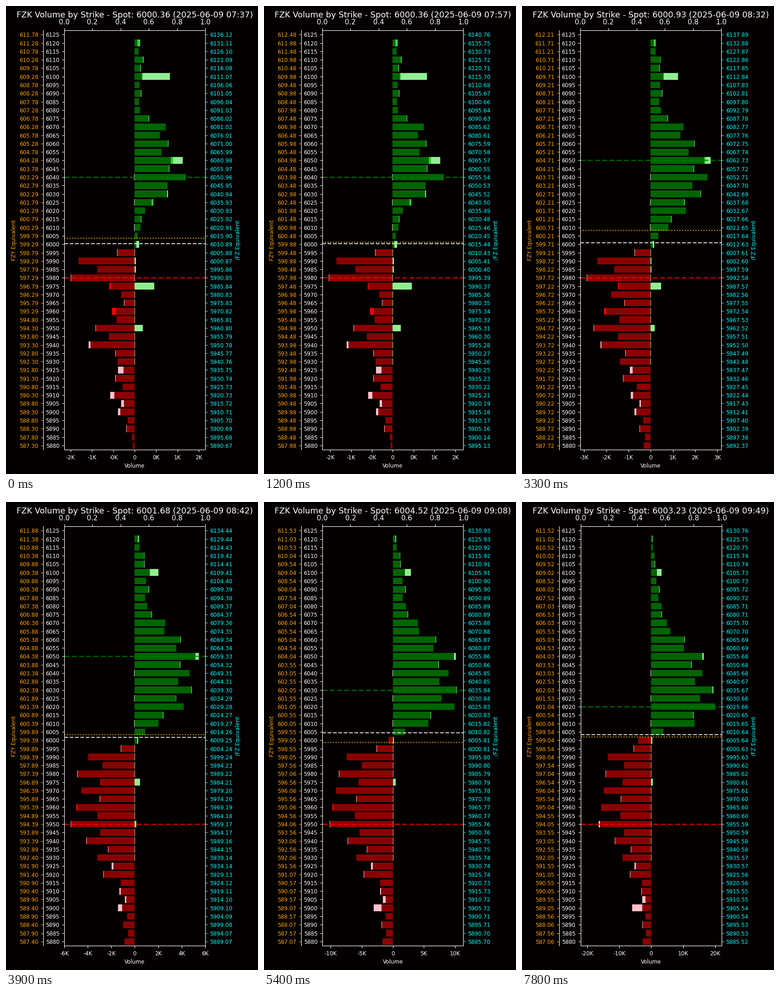
Animation of 549x1020 px, one loop 8000 ms. Source, as a matplotlib script:

```python
import matplotlib.pyplot as plt
import numpy as np
from matplotlib.animation import FuncAnimation
from matplotlib.collections import PolyCollection
from matplotlib.markers import TICKDOWN, TICKLEFT, TICKRIGHT, TICKUP
from matplotlib.patches import Rectangle

W, H, DPI = 549, 1020, 72  # at 72 dpi one point is one pixel
TOP, BOTTOM, HALF, MIDDLE_X = 53.2, 967, 153.55, 280.45
LEFT, RIGHT = MIDDLE_X - HALF, MIDDLE_X + HALF
FUND_X = LEFT - 0.3 * HALF
ROW = (BOTTOM - TOP) / 50
THIN, TICK, PAD = 1.19, 5.2, 10.4
SMALL, MEDIUM, LARGE = 11.89, 14.86, 17.83
BACK = "#040000"
COLORS = ["darkgreen", "limegreen", "lightgreen", "darkred", "red", "pink"]

STRIKES = np.arange(6125, 5875, -5)
ROWS_Y = TOP + ROW * (np.arange(50) + 0.5)


def profile(points):
    """Signed volume per strike; strikes off the tens trade less."""
    keys = sorted(points)
    volume = np.interp(STRIKES, keys, [points[k] for k in keys])
    return volume * np.where(STRIKES % 10, np.where(volume > 0, 0.78, 0.62), 1)


def blocks(points):
    return np.array([points.get(int(k), 0) for k in STRIKES], float)


# Calls are positive, puts negative
PREMARKET = profile({6125: 0, 6110: 230, 6080: 150, 6070: 900, 6050: 1050, 6040: 1500,
                     6030: 950, 6020: 300, 6000: 50, 5990: -1650, 5980: -1860, 5970: -400,
                     5960: -560, 5950: -1130, 5940: -1300, 5930: -500, 5910: -600, 5880: -60})
OPENING = profile({6125: 0, 6100: 2000, 6080: 1700, 6050: 7900, 6040: 6800, 6030: 7400,
                   6020: 6750, 6010: 3250, 6000: 300, 5990: -5500, 5980: -6900, 5950: -8250,
                   5940: -5950, 5920: -4000, 5910: -1600, 5880: -1400})
SESSION = profile({6125: 0, 6080: 3300, 6070: 4900, 6050: 16000, 6040: 16000, 6030: 19200,
                   6020: 20000, 6010: 13600, 6000: -4000, 5990: -13500, 5950: -16000,
                   5940: -11300, 5920: -6500, 5910: -2900, 5880: -2600})
MIDDLE = blocks({6120: 47, 6110: 25, 6100: 26, 6050: 60, 6025: 42, 5975: -30, 5960: -85})
OUTER = blocks({6100: 630, 6050: 220, 6030: 20, 6000: 60, 5990: 30, 5985: 25, 5975: 460,
                5950: 190, 5940: -40, 5925: -130, 5910: -95, 5905: -58, 5900: -53})
OUTER_GROWTH = blocks({6100: 730, 6050: 210, 6030: 200, 6000: 350, 5950: -550,
                       5925: -290, 5905: -1000, 5900: -3100})
CALL_HAIRLINE = (STRIKES >= 5930) & ((STRIKES % 15 == 0) | (STRIKES < 6000))
PUT_HAIRLINE = (STRIKES <= 6040) & (STRIKES % 15 == 10)

STEPS = [0, 4, 7, 11, 15, 22, 26]
FUND_RATIO = [.09988166, .0999967, .0999850, .09995244, .09984367, .09984006, .09983974]
FUTURE_RATIO = [1.0018148, 1.0025731, 1.00244817, 1.0021042, 1.00097952, 1.0009544, 1.0009396]
FLIP = [6003.6, 6001.1, 6000.8, 6008.4, 5998.2, 5999.6, 6001.95]


def strike_y(strike):
    return ROWS_Y[0] + (6125 - strike) * ROW / 5


def volumes_at(step):
    """Dark, middle and outer parts of the calls, then of the puts."""
    # Slow until the market opens at step 11: 0 premarket, 1 opening, 2 session
    phase = np.interp(step, [7, 10, 11, 15, 22, 26], [0, 0.02, 0.2, 1, 1.56, 2])
    early = PREMARKET * np.interp(step, [0, 4, 7], [0.8, 0.82, 1])
    start, end = (early, OPENING) if phase < 1 else (OPENING, SESSION)
    main = start + (end - start) * (phase - (phase >= 1))
    outer = OUTER + OUTER_GROWTH * (phase / 2) ** 2
    parts = [np.maximum(sign * v, 0) for sign in (1, -1) for v in (main, MIDDLE, outer)]
    pixel = 1.1 * abs(main).max() / HALF
    parts[2] = np.maximum(parts[2], pixel * CALL_HAIRLINE)
    parts[5] = np.maximum(parts[5], pixel * PUT_HAIRLINE)
    return np.array(parts)


def tick_step(limit):
    base = 10 ** np.floor(np.log10(limit / 4))
    return next(m * base for m in (1, 2, 2.5, 5, 10) if 2 * limit / (m * base) <= 8)


plt.rcParams["font.family"] = "DejaVu Sans"
fig = plt.figure(figsize=(W / DPI, H / DPI), dpi=DPI, facecolor=BACK)
ax = fig.add_axes([0, 0, 1, 1])
ax.set(xlim=(0, W), ylim=(H, 0))
ax.axis("off")


def label(x, y, text="", size=SMALL, color="white", ha="center", va="baseline", **kw):
    return ax.text(x, y, text, size=size, color=color, ha=ha, va=va, **kw)


def column(x, color, ha):
    return [label(x, y, color=color, ha=ha, va="center_baseline") for y in ROWS_Y]


def ticks(x, y, marker, color="white"):
    return ax.plot(x, y, ls="none", marker=marker, ms=TICK, mew=THIN, color=color, zorder=4)[0]


def level(color, style, width, alpha):
    return ax.plot([], [], color=color, ls=style, lw=width, alpha=alpha, zorder=3)[0]


bars = PolyCollection([], linewidths=0, zorder=2)
ax.add_collection(bars, autolim=False)
call_wall = level("green", "--", 2.97, 0.7)
put_wall = level("red", "--", 2.97, 0.7)
spot_line = level("white", "--", 2.2, 0.8)
flip_line = level("gold", ":", 2.2, 0.8)

frame_box = Rectangle((LEFT, TOP), 2 * HALF, BOTTOM - TOP, fill=False, ec="white", lw=THIN, zorder=5)
ax.add_patch(frame_box)
ax.plot([FUND_X, FUND_X], [TOP, BOTTOM], color="white", lw=THIN, zorder=5)

title = label(MIDDLE_X, 25, size=LARGE)
fund_labels = column(FUND_X - PAD, "orange", "right")
strike_labels = column(LEFT - PAD, "white", "right")
future_labels = column(RIGHT + PAD, "cyan", "left")
for text, strike in zip(strike_labels, STRIKES):
    text.set_text(str(strike))
for x, name, color in ((10.7, "FZY Equivalent", "orange"), (499.1, "/FZ Equivalent", "cyan")):
    label(x, (TOP + BOTTOM) / 2, name, color=color, ha="left", va="center", rotation=90)
axis_name = label(MIDDLE_X, 1006, "Volume")

ticks([FUND_X] * 50, ROWS_Y, TICKLEFT, "orange")
strike_ticks = ticks([LEFT] * 50, ROWS_Y, TICKLEFT)
future_ticks = ticks([RIGHT] * 50, ROWS_Y, TICKRIGHT, "cyan")
top_ticks = ticks([0] * 6, [TOP] * 6, TICKUP)
top_labels = [label(0, 40, f"{v / 5:.1f}", MEDIUM) for v in range(6)]
volume_ticks = ticks([], [], TICKDOWN)
volume_labels = [label(0, 988) for _ in range(9)]


def draw_bars(volumes, center, scale):
    boxes, colors = [], []
    for first, sign in ((0, 1), (3, -1)):
        edges = np.vstack([np.zeros(50), np.cumsum(volumes[first:first + 3], axis=0)])
        edges = center + sign * scale * edges
        for part in range(3):
            for x0, x1, y in zip(edges[part], edges[part + 1], ROWS_Y):
                if abs(x1 - x0) > 0.2:
                    lo, hi = y - 0.4 * ROW, y + 0.4 * ROW
                    boxes.append([(x0, lo), (x1, lo), (x1, hi), (x0, hi)])
                    colors.append(COLORS[first + part])
    bars.set_verts(boxes)
    bars.set_facecolor(colors)


def draw_axes(center, limit):
    left, right = center - HALF, center + HALF
    frame_box.set_x(left)
    strike_ticks.set_xdata([left] * 50)
    future_ticks.set_xdata([right] * 50)
    top_x = np.linspace(left, right, 6)
    top_ticks.set_xdata(top_x)
    for text, x in zip(top_labels, top_x):
        text.set_x(x)
    axis_name.set_x(center)

    step = tick_step(limit)
    count = int(limit // step)
    values = step * np.arange(-count, count + 1)
    xs = center + values / limit * HALF
    volume_ticks.set_data(xs, [BOTTOM] * len(xs))
    for i, text in enumerate(volume_labels):
        text.set_visible(i < len(xs))
        if i < len(xs):
            text.set_x(xs[i])
            text.set_text(f"{values[i] / 1000:.0f}K" if values[i] else "0")


def draw(frame):
    step = min(frame // 3, 26)
    volumes = volumes_at(step)
    calls, puts = volumes[:3].sum(axis=0), volumes[3:].sum(axis=0)
    limit = 1.1 * max(calls.max(), puts.max())
    center = MIDDLE_X + np.interp(step, [15, 22, 26], [0, 0.3, 0.95])
    spot = np.interp(step, [10, 11, 15, 22, 26], [6000.36, 6000.93, 6002.43, 6007.31, 6003.23])
    minute = round(np.interp(step, [0, 11, 15, 22, 26], [457, 512, 533, 569, 589]))

    draw_bars(volumes, center, HALF / limit)
    draw_axes(center, limit)
    levels = [(call_wall, STRIKES[calls.argmax()]), (put_wall, STRIKES[puts.argmax()]),
              (spot_line, spot), (flip_line, np.interp(step, STEPS, FLIP))]
    for line, strike in levels:
        line.set_data([center - HALF, center + HALF], [strike_y(strike)] * 2)
    for labels, ratios in ((fund_labels, FUND_RATIO), (future_labels, FUTURE_RATIO)):
        ratio = np.interp(step, STEPS, ratios)
        for text, strike in zip(labels, STRIKES):
            text.set_text(f"{strike * ratio:.2f}")
    title.set_text(f"FZK Volume by Strike - Spot: {spot:.2f} "
                   f"(2025-06-09 {minute // 60:02d}:{minute % 60:02d})")
    return []


anim = FuncAnimation(fig, draw, frames=80, init_func=lambda: draw(0), interval=100, repeat=True)
plt.show()
```
